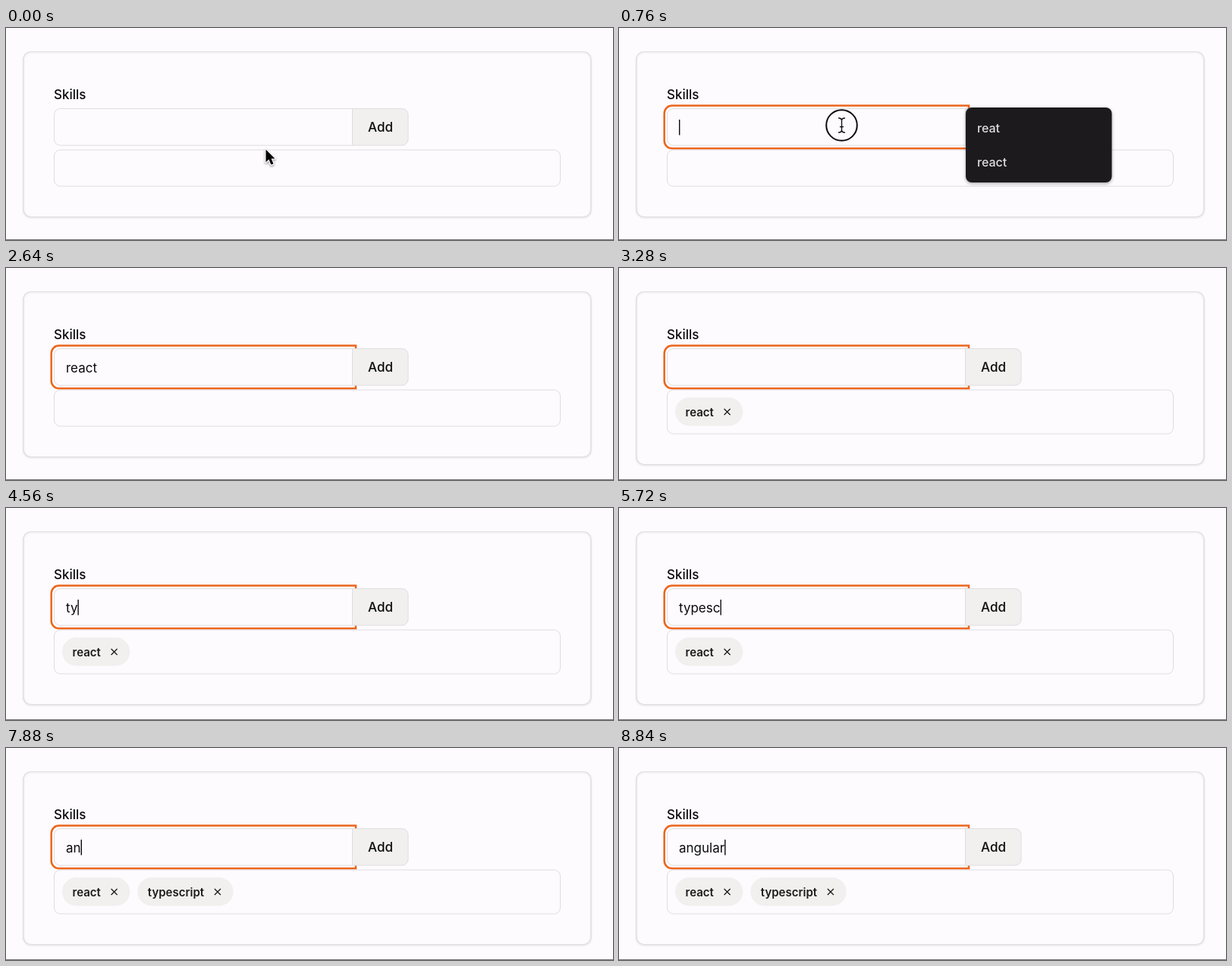
Write an HTML page with a canvas that moves like this. It is 800 by 280 pixels and loops after 9000 ms.

```html
<!DOCTYPE html>
<html lang="en">
<head>
<meta charset="utf-8">
<title>Skills input</title>
<style>
  html, body { margin: 0; width: 100%; height: 100%; overflow: hidden; background: #fdfbfe; }
  canvas { display: block; width: 800px; height: 280px; }
</style>
</head>
<body>
<canvas id="stage"></canvas>
<script>
const LOOP = 9000;
const PAGE = '#fdfbfe', LINE = '#dedde0', SOFT = '#f1f0ee', INK = '#0b0b0c', ORANGE = '#ec661c';
const FONT = 'Inter, "Liberation Sans", sans-serif';

const canvas = document.getElementById('stage');
const ctx = canvas.getContext('2d');
const ratio = window.devicePixelRatio || 1;
canvas.width = 800 * ratio;
canvas.height = 280 * ratio;

// Words with the time of each key press and the time they are added.
const words = [
  { text: 'react', keys: [1680, 1800, 1880, 2000, 2100], added: 2680 },
  { text: 'typescript', keys: [4320, 4560, 4760, 4960, 5160, 5440, 5760, 5960, 6160, 6400], added: 7000 },
  { text: 'angular', keys: [7760, 7880, 8000, 8120, 8240, 8360, 8460], added: Infinity }
];
const FOCUS = 680;
const MENU_END = 2200;
const caretGaps = [[1120, 1520], [2160, 2640], [3160, 3640], [6480, 6720], [7400, 7720], [8480, 8640]];

const clamp = v => Math.max(0, Math.min(1, v));
const ramp = (t, from, to) => clamp((t - from) / (to - from));
const ease = p => p * p * (3 - 2 * p);

function roundBox(x, y, w, h, r, fill, stroke, width = 1) {
  ctx.beginPath();
  ctx.roundRect(x, y, w, h, r);
  if (fill) { ctx.fillStyle = fill; ctx.fill(); }
  if (stroke) { ctx.strokeStyle = stroke; ctx.lineWidth = width; ctx.stroke(); }
}

function label(text, x, y, size, weight, color = INK) {
  ctx.font = `${weight} ${size}px ${FONT}`;
  ctx.fillStyle = color;
  ctx.fillText(text, x, y);
}

function withShadow(color, blur, dy, draw) {
  ctx.save();
  ctx.shadowColor = color;
  ctx.shadowBlur = blur * ratio;
  ctx.shadowOffsetY = dy * ratio;
  draw();
  ctx.restore();
}

function typedAt(t) {
  const word = words.find(w => t < w.added);
  return word.text.slice(0, word.keys.filter(k => k <= t).length);
}

function caretAlpha(t) {
  if (t < FOCUS) return 0;
  return caretGaps.reduce((a, [off, on]) =>
    Math.min(a, Math.max(1 - ramp(t, off, off + 120), ramp(t, on, on + 80))), 1);
}

function drawInput(t) {
  const text = typedAt(t);
  roundBox(63.5, 106.5, 393, 48.5, [8, 0, 0, 8], null, LINE);
  if (t >= FOCUS) roundBox(59.7, 102.6, 401.3, 56.5, [10, 0, 0, 10], null, ORANGE, 2.5);
  roundBox(456.5, 106.5, 73.5, 48.5, [0, 8, 8, 0], SOFT, LINE);
  label('Add', 477, 137, 17, 500);

  label(text, 79, 137.5, 17, 400);
  const x = 79 + ctx.measureText(text).width;
  ctx.globalAlpha = caretAlpha(t);
  ctx.fillStyle = INK;
  ctx.fillRect(x, 121, 1.4, 20.5);
  ctx.globalAlpha = 1;
}

function drawChip(text, x) {
  ctx.font = `600 15px ${FONT}`;
  const w = ctx.measureText(text).width + 52;
  roundBox(x, 171, w, 37.5, 18.75, SOFT);
  label(text, x + 13.5, 195.5, 15, 600, '#1b1b1b');
  const cx = x + w - 20.7, cy = 190, r = 4;
  ctx.beginPath();
  ctx.moveTo(cx - r, cy - r); ctx.lineTo(cx + r, cy + r);
  ctx.moveTo(cx + r, cy - r); ctx.lineTo(cx - r, cy + r);
  ctx.strokeStyle = '#1b1b1b';
  ctx.lineWidth = 1.3;
  ctx.stroke();
  return x + w + 10;
}

function drawMenu(t) {
  const alpha = ramp(t, FOCUS, 740) * (1 - ramp(t, MENU_END, 2280));
  if (!alpha) return;
  const rows = ['reat', 'react'].filter(s => s.startsWith(typedAt(t)));
  ctx.globalAlpha = alpha;
  withShadow('rgba(0,0,0,.35)', 4, 1.5, () =>
    roundBox(457, 105, 192.5, 10 + 44.5 * rows.length, 8, '#1c1a1d'));
  rows.forEach((s, i) => label(s, 472, 138 + 44.5 * i, 16, 500, '#dfdde0'));
  ctx.globalAlpha = 1;
}

function drawArrow(x, y) {
  const shape = new Path2D('M0 0V16.8L3.9 13.1L6.9 20.1L10 18.8L7 12H12Z');
  ctx.save();
  ctx.translate(x, y);
  ctx.lineJoin = 'round';
  ctx.strokeStyle = '#fff';
  ctx.lineWidth = 2.4;
  withShadow('rgba(0,0,0,.4)', 3, 1.5, () => ctx.stroke(shape));
  ctx.fillStyle = '#000';
  ctx.fill(shape);
  ctx.restore();
}

function drawBeam(x, y) {
  const shape = new Path2D('M-4-9.5Q0-9.5 0-6Q0-9.5 4-9.5M0-6V6M-4 9.5Q0 9.5 0 6Q0 9.5 4 9.5M-2 2H2');
  ctx.save();
  ctx.translate(x, y);
  ctx.lineCap = 'round';
  for (const [color, width] of [['#fff', 3], ['#111', 1.4]]) {
    ctx.strokeStyle = color;
    ctx.lineWidth = width;
    ctx.stroke(shape);
  }
  ctx.restore();
}

function drawPointer(t) {
  if (t >= words[0].keys[0]) return;
  const p = ease(ramp(t, 150, 320));
  const x = 342.5 - 49 * p, y = 160.5 - 32 * p;
  const press = ramp(t, 660, 740) * (1 - ramp(t, 860, 1000));
  if (press) {
    ctx.globalAlpha = press;
    ctx.beginPath();
    ctx.arc(x, y, 20.3, 0, Math.PI * 2);
    ctx.fillStyle = PAGE;
    ctx.fill();
    ctx.strokeStyle = '#0b0b0c';
    ctx.lineWidth = 2;
    ctx.stroke();
    ctx.globalAlpha = 1;
  }
  if (y > 155) drawArrow(x, y);
  else drawBeam(x, y);
}

function draw(t) {
  ctx.setTransform(ratio, 0, 0, ratio, 0, 0);
  ctx.fillStyle = PAGE;
  ctx.fillRect(0, 0, 800, 280);
  ctx.fillStyle = '#777578';
  ctx.fillRect(0, 279, 800, 1);

  const chips = words.filter(w => t >= w.added);
  const grow = chips.length ? 10 : 0;
  withShadow('rgba(0,0,0,.09)', 3, 1, () =>
    roundBox(23, 31.5, 748, 218 + grow, 10, PAGE, LINE, 1.2));
  label('Skills', 63, 94, 17, 500);
  roundBox(63.5, 161, 667, 48 + grow, 8, null, LINE);
  chips.reduce((x, w) => drawChip(w.text, x), 74);
  drawInput(t);
  drawMenu(t);
  drawPointer(t);
}

const start = performance.now();
function tick() {
  draw((performance.now() - start) % LOOP);
  requestAnimationFrame(tick);
}
tick();
</script>
</body>
</html>
```
